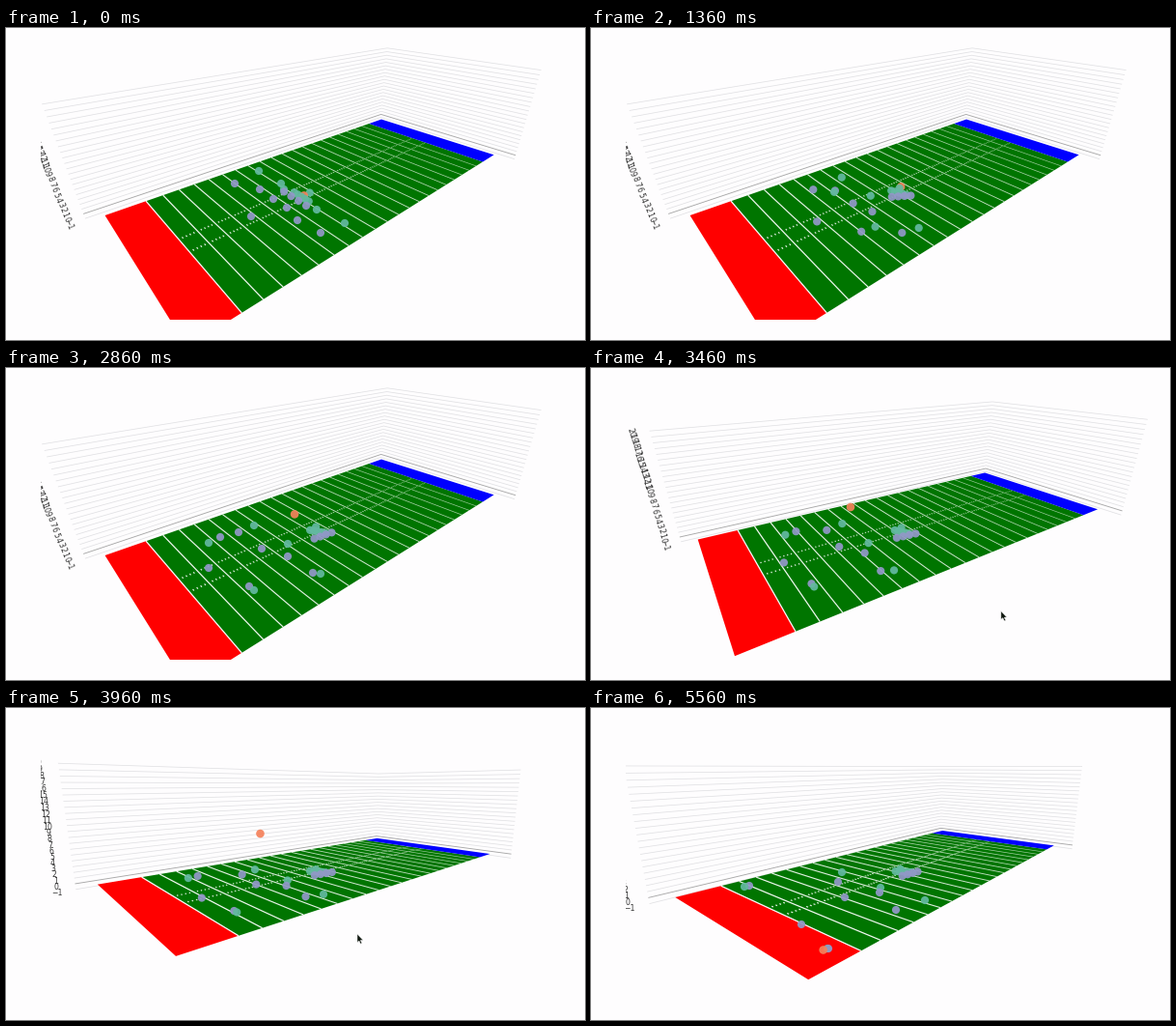
Write a matplotlib script that moves like this. It is 600 px wide and 323 px high and loops after 5.6 s.

```python
import numpy as np
import matplotlib.pyplot as plt
from matplotlib.animation import FuncAnimation
from matplotlib.collections import LineCollection
from matplotlib.patches import Polygon

W, H, DPI = 600, 323, 100
LOOP, STEP = 5600, 20
PX = 72 / DPI
LEFT, BOTTOM = 36, 302                   # edges of the plot canvas

TEAL, PURPLE, ORANGE = "#63b9a0", "#9298c8", "#f5825c"

# Scene in yards: field, wall box and the point the camera orbits
LENGTH, WIDTH, GOAL, END = 120, 53.6, 11, 111
X0, X1, Y0, Y1 = -4.3, 125.7, -4.8, 59.2
CENTER, FLOOR, RISE = (53, 27.6), -4.9, 1.56
FOCAL, DIST, CX, CY = 362, 107, 320, 152

# Orbit: a quick drag swings the view round, low, and back
CAM_T = [3380, 3600, 3720, 3960, 4120]
AZIMUTH = [48.4, 69, 77, 47.5, 39.6]
ELEVATION = [28.2, 15.7, 7, 11.4, 14.1]

MOUSE_T = [2920, 3380, 3560, 3680, 3960, 4120, 4740, 4960]
MOUSE_X = [400, 372, 491, 491, 364, 322, 322, 328]
MOUSE_Y = [308, 285, 210, 210, 234, 252, 252, 293]
ARROW = np.array([(0, 0), (0, 8.6), (1.9, 7), (3.4, 10.2), (4.8, 9.6),
                  (3.4, 6.5), (5.9, 6.3)])

# Start, break and finish of each route, as seen on screen
ROUTE_T = [0, 2860, 5560]
RECEIVERS = [
    [(262, 148), (257, 163), (260, 170)],
    [(285, 161), (210, 181), (159, 185)],
    [(288, 167), (292, 182), (300, 186)],
    [(351, 202), (326, 213), (346, 199)],
    [(322, 188), (257, 230), (245, 249)],
]
COVERAGE = [
    [(237, 161), (222, 175), (164, 184)],
    [(263, 167), (241, 170), (256, 180)],
    [(277, 177), (265, 187), (263, 196)],
    [(291, 186), (292, 195), (299, 191)],
    [(254, 195), (210, 207), (218, 224)],
    [(302, 199), (252, 226), (246, 249)],
    [(326, 212), (318, 212), (316, 209)],
]

SNAP, POCKET, CATCH = np.array([(47.8, 28.5), (54, 27), (7, 48.3)])
THROW_T, CATCH_T, PEAK = 2100, 5300, 10.1


def smooth(s):
    s = np.clip(s, 0, 1)
    return s * s * (3 - 2 * s)


def camera(t):
    """Sines and cosines of azimuth and elevation."""
    az, el = (np.radians(np.interp(t, CAM_T, a)) for a in (AZIMUTH, ELEVATION))
    return np.sin(az), np.cos(az), np.sin(el), np.cos(el)


def project(cam, pts, z=0):
    """Field points (x, y) at height z to screen pixels."""
    sa, ca, se, ce = cam
    pts = np.asarray(pts, float)
    p, q = pts[..., 0] - CENTER[0], pts[..., 1] - CENTER[1]
    zc = FLOOR + RISE * z
    right, ahead = p * sa + q * ca, p * ca - q * sa
    depth = DIST + ahead * ce - zc * se
    up = zc * ce + ahead * se
    return np.stack([CX + FOCAL * right / depth,
                     CY - FOCAL * up / depth], -1)


def ground(cam, pix):
    """Screen pixels back to points on the field."""
    sa, ca, se, ce = cam
    pix = np.asarray(pix, float)
    a, b = (pix[..., 0] - CX) / FOCAL, (CY - pix[..., 1]) / FOCAL
    ahead = (b * DIST - FLOOR * (ce + b * se)) / (se - b * ce)
    right = a * (DIST + ahead * ce - FLOOR * se)
    return np.stack([right * sa + ahead * ca + CENTER[0],
                     right * ca - ahead * sa + CENTER[1]], -1)


routes = np.array(RECEIVERS + COVERAGE, float)
start, cut, finish = (ground(camera(t), routes[:, k])
                      for k, t in enumerate(ROUTE_T))

# Both lines face each other, then pile up around the pocket
k, j = np.arange(-2, 3), np.arange(4)
line_start = np.concatenate([
    np.column_stack([0 * k + 46.8, 28.5 + 1.7 * k]),
    np.column_stack([0 * j + 44.7, 22.7 + 3.5 * j]), [(50.2, 28.4)]])
line_end = np.concatenate([
    np.column_stack([52.5 + 0.6 * k, 29.5 + 1.1 * k]),
    np.column_stack([49 + 2.1 * j, 31.9 + 0.3 * j]), [POCKET]])


def runners(t):
    if t < ROUTE_T[1]:
        return start + (cut - start) * smooth(t / ROUTE_T[1])
    s = min(1, (t - ROUTE_T[1]) / (ROUTE_T[2] - ROUTE_T[1]))
    return cut + (finish - cut) * s


def linemen(t):
    return line_start + (line_end - line_start) * smooth(t / 2000)


def ball(t):
    """Ground point and height: snap, hold, then a lob."""
    if t < THROW_T:
        return SNAP + (POCKET - SNAP) * smooth(t / 1000), 0
    s = min(1, (t - THROW_T) / (CATCH_T - THROW_T))
    return POCKET + (CATCH - POCKET) * s ** 0.9, PEAK * 4 * s * (1 - s)


def strip(x0, x1):
    return [(x0, 0), (x1, 0), (x1, WIDTH), (x0, WIDTH)]


def white(alpha):
    return [(1, 1, 1, a) for a in alpha]


fig = plt.figure(figsize=(W / DPI, H / DPI), dpi=DPI, facecolor="#fefdfe")
ax = fig.add_axes([LEFT / W, 1 - BOTTOM / H, 1 - LEFT / W, BOTTOM / H])
ax.set(xlim=(LEFT, W), ylim=(BOTTOM, 0))
ax.axis("off")


def lines(widths, colors, zorder):
    return ax.add_collection(LineCollection(
        [], linewidths=np.asarray(widths) * PX, colors=colors, zorder=zorder))


# Back walls and their tick labels
levels = np.arange(-1, 21)
wall_path = [(X0, Y0), (X1, Y0), (X1, Y1)]
walls = lines(np.where(levels == 0, 0.9, 0.75),
              ["#a8a8a8" if z == 0 else "#e0e0e3" for z in levels], 1)
labels = [ax.text(0, 0, str(z).replace("-", "\u2212"), fontsize=7.8 * PX,
                  family="DejaVu Sans", color="#333333", ha="center",
                  va="center", clip_on=True, zorder=2) for z in levels]

# Field
zones = [(strip(GOAL, END), "#007500"), (strip(0, GOAL), "#ff0000"),
         (strip(END, LENGTH), "#0000ff")]
patches = [ax.add_patch(Polygon(shape, color=c, lw=0, zorder=3))
           for shape, c in zones]

yards = np.arange(GOAL, END, 5)
yard_pts = [[(x, 0), (x, WIDTH)] for x in yards]
yard_lines = lines(1.35 - 0.8 * yards / LENGTH,
                   white(1 - 0.45 * yards / LENGTH), 4)

hash_pts = np.array([[(x, y - 0.35), (x, y + 0.35)]
                     for y in (0.442 * WIDTH, 0.558 * WIDTH)
                     for x in range(GOAL + 1, END) if (x - GOAL) % 5])
far = hash_pts[:, 0, 0] / LENGTH
hashes = lines(1.3 - 0.7 * far, white(0.95 - 0.55 * far), 4)

# Ball, runners, linemen, passer
colors = np.array([ORANGE] + [TEAL] * 5 + [PURPLE] * 7
                  + [TEAL] * 5 + [PURPLE] * 4 + [TEAL])
areas = (np.array([8.6] + [8.2] * 22) * PX) ** 2
dots = ax.scatter(np.zeros(23), np.zeros(23), s=areas, c=colors,
                  linewidths=0, alpha=0.93, zorder=5)

mouse = ax.add_patch(Polygon(ARROW, fc="#101810", ec="#e8e8e8", lw=0.35,
                             clip_on=False, zorder=9))


def draw_labels(cam):
    spots = project(cam, np.tile((X0 - 4.1, Y0), (len(levels), 1)), levels)
    dx, dy = spots[0] - spots[-1]
    tilt = np.degrees(np.arctan2(dy, dx))
    # Text follows an axis that leans clearly, else stays level
    turn = -tilt if abs(tilt - 90) > 15 else 0
    for label, spot in zip(labels, spots):
        label.set_position(spot)
        label.set_rotation(turn)


def update(i):
    t = i * STEP
    cam = camera(t)

    walls.set_segments([project(cam, wall_path, z) for z in levels])
    draw_labels(cam)
    for patch, (shape, _) in zip(patches, zones):
        patch.set_xy(project(cam, shape))
    yard_lines.set_segments(project(cam, yard_pts))
    hashes.set_segments(project(cam, hash_pts))

    spot, height = ball(t)
    field = np.concatenate([[spot], runners(t), linemen(t)])
    pos = project(cam, field)
    order = np.argsort(pos[:, 1], kind="stable")
    pos[0] = project(cam, spot, height)
    dots.set_offsets(pos[order])
    dots.set_facecolors(colors[order])
    dots.set_sizes(areas[order])

    mouse.set_visible(MOUSE_T[0] <= t < MOUSE_T[-1])
    mouse.set_xy(ARROW + (np.interp(t, MOUSE_T, MOUSE_X),
                          np.interp(t, MOUSE_T, MOUSE_Y)))
    return []


anim = FuncAnimation(fig, update, frames=LOOP // STEP, interval=STEP,
                     init_func=lambda: update(0), repeat=True, repeat_delay=0)
plt.show()
```
